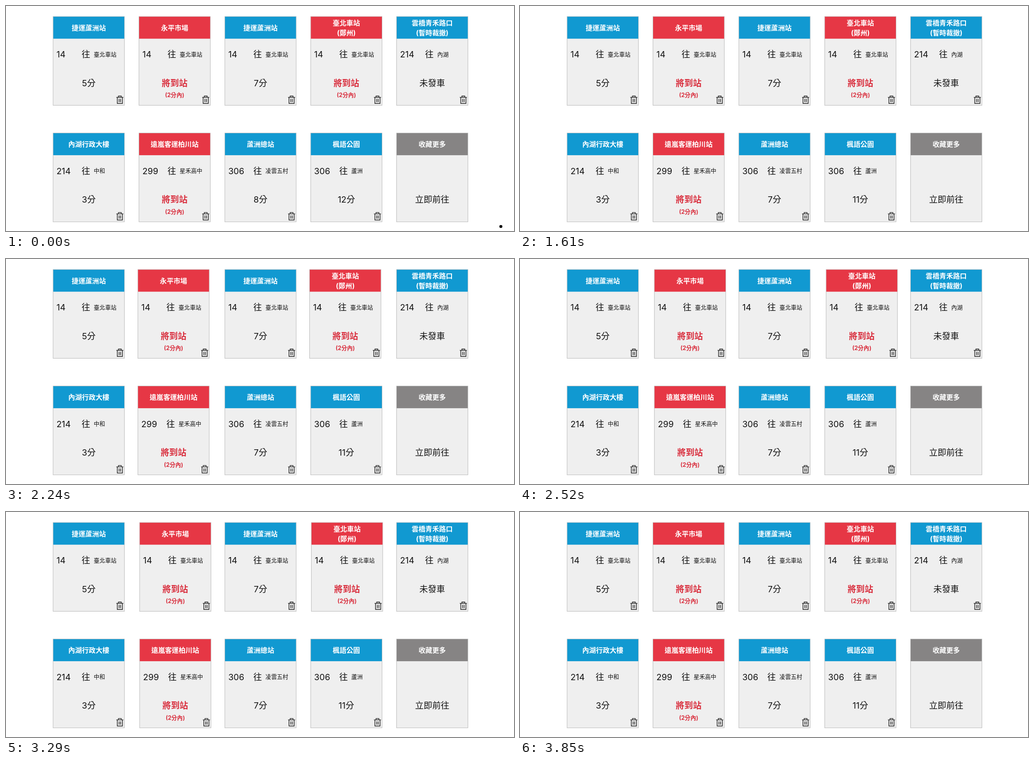
An HTML page for the animation above (3920 ms loop, 1122 by 499 pixels).

```html
<!DOCTYPE html>
<html lang="zh-Hant">
<head>
<meta charset="utf-8">
<title>公車到站</title>
<style>
  html, body { margin: 0; width: 100%; height: 100%; overflow: hidden; background: #fff; }
  svg { display: block; font-family: Inter, "Noto Sans CJK TC", "Noto Sans CJK", sans-serif; }
  text { fill: #111; }
  .title { font-size: 15.1px; font-weight: 700; fill: #fff; text-anchor: middle; }
  .big { font-size: 18.9px; }
  .small { font-size: 12.55px; }
  .mid { text-anchor: middle; }
  .alert { font-weight: 700; fill: #d9303f; }
  .bin { fill: none; stroke: #3a3a3a; stroke-width: 1.7; stroke-linejoin: round; stroke-linecap: round; }
</style>
</head>
<body>
<svg id="stage" width="1122" height="499" viewBox="0 0 1122 499"></svg>
<script>
const LOOP = 3920;
const DOT_END = 70;
const REFRESH = 490;
const SHAKE_START = 1730;
const SHAKE_LENGTH = 2000;
const SHAKE_SCALE = 0.79;
const BLUE = '#1199d1', RED = '#e63745', GREY = '#868484';

const stage = document.getElementById('stage');

// wait: one label, or [before refresh, after refresh]
const cards = [
  { title: ['捷運蘆洲站'], route: '14', dest: '臺北車站', wait: '5分' },
  { title: ['永平市場'], route: '14', dest: '臺北車站', arriving: true },
  { title: ['捷運蘆洲站'], route: '14', dest: '臺北車站', wait: '7分' },
  { title: ['臺北車站', '(鄭州)'], route: '14', dest: '臺北車站', arriving: true },
  { title: ['雲橋青禾路口', '(暫時裁撤)'], route: '214', dest: '內湖', wait: '未發車' },
  { title: ['內湖行政大樓'], route: '214', dest: '中和', wait: '3分' },
  { title: ['遠嵐客運柏川站'], route: '299', dest: '星禾高中', arriving: true },
  { title: ['蘆洲總站'], route: '306', dest: '凌雲五村', wait: ['8分', '7分'] },
  { title: ['楓語公園'], route: '306', dest: '蘆洲', wait: ['12分', '11分'] },
  { title: ['收藏更多'], wait: '立即前往', more: true }
];

function add(parent, tag, attrs, text) {
  const node = document.createElementNS('http://www.w3.org/2000/svg', tag);
  for (const key in attrs) node.setAttribute(key, attrs[key]);
  if (text) node.textContent = text;
  return parent.appendChild(node);
}

function label(parent, cls, x, y, text) {
  return add(parent, 'text', { class: cls, x, y }, text);
}

function buildCard(card, i) {
  card.x = 103.8 + (i % 5) * 189.65;
  card.y = 23 + Math.floor(i / 5) * 258.4;
  const g = card.node = add(stage, 'g', { transform: `translate(${card.x} ${card.y})` });
  const color = card.more ? GREY : card.arriving ? RED : BLUE;
  add(g, 'rect', { x: 0.2, y: 0.3, width: 157.6, height: 197, fill: '#efefef', stroke: '#b9b9b9' });
  add(g, 'rect', { x: 0.6, y: 0.7, width: 156.8, height: 48.8, fill: color });

  const firstLine = card.title.length > 1 ? 20.4 : 30.9;
  card.title.forEach((line, n) => label(g, 'title', 79, firstLine + n * 21.4, line));

  if (card.route) {
    label(g, 'big', 7.8, 91.3, card.route);
    label(g, 'big', 63.2, 91.3, '往');
    label(g, 'small', 90, 89, card.dest);
    add(g, 'path', {
      class: 'bin',
      d: 'M140.6 179.6H154.8M144.5 179.3V176.6H150.9V179.3M142 180V193.2H153.4V180M146 183.7V189.4M149.4 183.7V189.4'
    });
  }
  if (card.arriving) {
    label(g, 'big mid alert', 79, 155, '將到站');
    label(g, 'small mid alert', 79, 179.4, '(2分內)');
  } else {
    card.waitNode = label(g, 'big mid', 79, 155, [].concat(card.wait)[0]);
  }
}

function bezier(x1, y1, x2, y2) {
  const at = (a, b, s) => 3 * (1 - s) * (1 - s) * s * a + 3 * (1 - s) * s * s * b + s * s * s;
  return x => {
    let lo = 0, hi = 1;
    for (let i = 0; i < 24; i++) {
      const s = (lo + hi) / 2;
      if (at(x1, x2, s) < x) lo = s; else hi = s;
    }
    return at(y1, y2, lo);
  };
}

const ease = bezier(0.36, 0.07, 0.19, 0.97);
const shakeKeys = [0, -1, 2, -4, 4, -4, 4, -4, 2, -1, 0];

function shakeOffset(t) {
  const phase = (t - SHAKE_START) / SHAKE_LENGTH * 10;
  if (phase <= 0 || phase >= 10) return 0;
  const k = Math.floor(phase);
  return SHAKE_SCALE * (shakeKeys[k] + (shakeKeys[k + 1] - shakeKeys[k]) * ease(phase - k));
}

cards.forEach(buildCard);
const dot = add(stage, 'circle', { cx: 1093, cy: 489, r: 3.3, fill: '#000' });

function render(t) {
  dot.setAttribute('visibility', t < DOT_END ? 'visible' : 'hidden');
  const dx = shakeOffset(t);
  for (const card of cards) {
    if (card.arriving) card.node.setAttribute('transform', `translate(${card.x + dx} ${card.y})`);
    if (Array.isArray(card.wait)) card.waitNode.textContent = card.wait[t < REFRESH ? 0 : 1];
  }
}

const start = performance.now();
function tick() {
  render((performance.now() - start) % LOOP);
  requestAnimationFrame(tick);
}
render(0);
requestAnimationFrame(tick);
</script>
</body>
</html>
```
